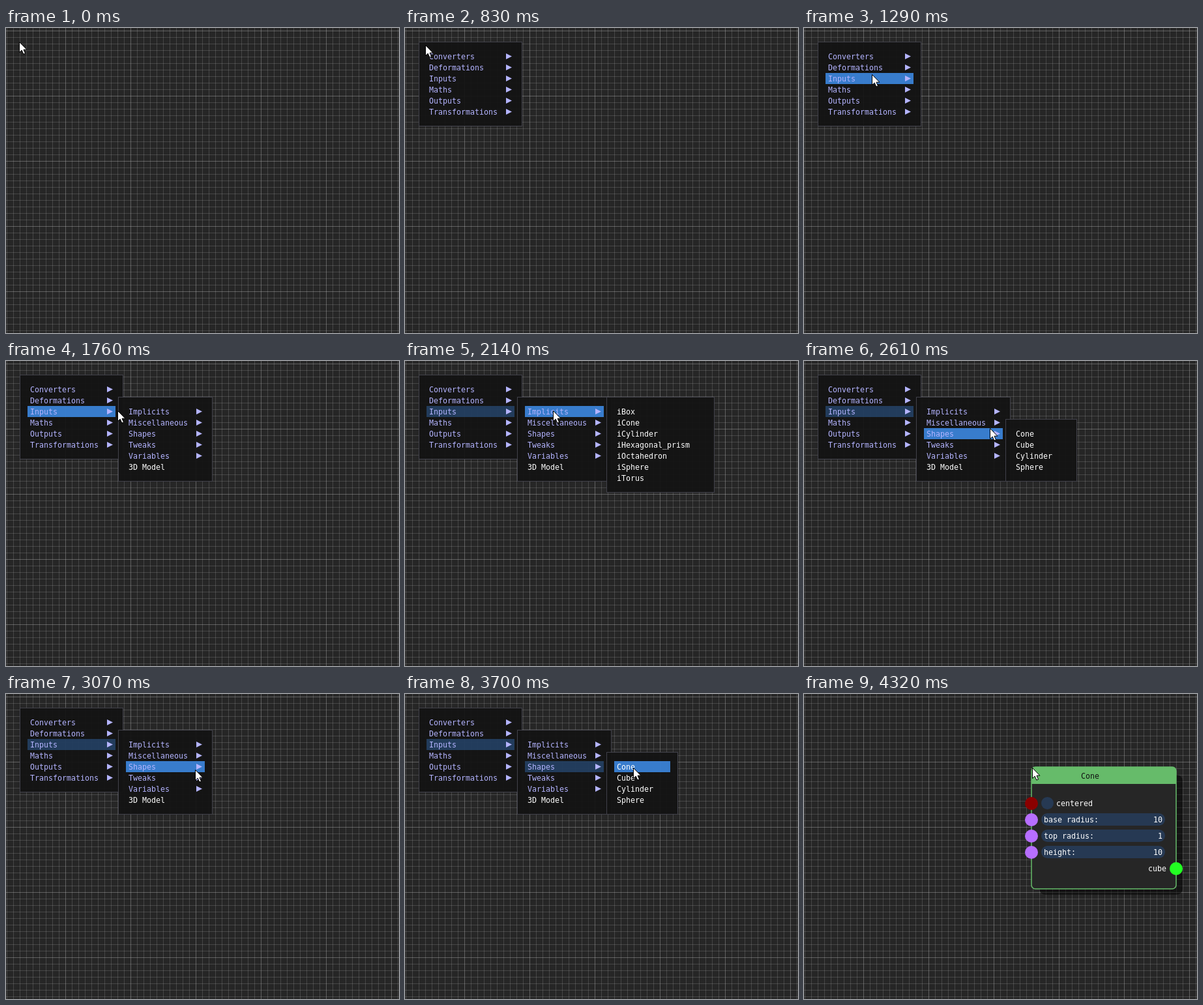
Write an HTML page with a canvas that moves like this. It is 603 px wide and 468 px high and loops after 6.2 s.

```html
<!DOCTYPE html>
<html>
<head>
<meta charset="utf-8">
<style>
html, body { margin: 0; width: 100%; height: 100%; overflow: hidden; background: #262626; }
canvas { display: block; }
</style>
</head>
<body>
<canvas id="stage" width="603" height="468"></canvas>
<script>
const LOOP = 6200, ROW = 17;
const HOVER = 'rgba(66,150,250,.8)', OPEN = 'rgba(66,150,250,.31)';
const LILAC = '#b4b4ff', WHITE = '#fff', GREEN = '#66bb6a', FIELD = '#263953';
const ctx = document.getElementById('stage').getContext('2d');

// Labels ending in ">" open a submenu.
const mainMenu = { x: 21, y: 21, w: 159,
  items: ['Converters>', 'Deformations>', 'Inputs>', 'Maths>', 'Outputs>', 'Transformations>'] };
const inputMenu = { x: 172, y: 55, w: 145,
  items: ['Implicits>', 'Miscellaneous>', 'Shapes>', 'Tweaks>', 'Variables>', '3D Model'] };
const implicitMenu = { x: 309, y: 55, w: 166,
  items: ['iBox', 'iCone', 'iCylinder', 'iHexagonal_prism', 'iOctahedron', 'iSphere', 'iTorus'] };
const shapeMenu = { x: 309, y: 89, w: 110, items: ['Cone', 'Cube', 'Cylinder', 'Sphere'] };

// Pointer moves: first step, last step, number of steps.
const bursts = [[830, 1450, 9], [1680, 2290, 9], [2370, 2920, 8], [3070, 3160, 2], [3480, 3700, 4]];
// Pointer path: time, x, y.
const path = [[0, 20, 21], [830, 31, 26], [1290, 102, 71], [1450, 150, 76], [1680, 160, 76],
  [2140, 227, 76], [2290, 240, 78], [2370, 248, 82], [2610, 286, 103], [2920, 290, 122],
  [3070, 290, 116], [3160, 290, 113], [3480, 298, 112], [3700, 350, 113]];

function stepTime(t) {
  let held = 0;
  for (const [start, end, n] of bursts) {
    if (t < start) break;
    const dt = (end - start) / (n - 1);
    held = start + dt * Math.min(n - 1, Math.floor((t - start + 6) / dt));
  }
  return held;
}

function pointerAt(t) {
  const s = stepTime(t);
  const i = path.findIndex(k => k[0] >= s);
  const b = path[i], a = path[Math.max(0, i - 1)];
  const f = b === a ? 0 : (s - a[0]) / (b[0] - a[0]);
  return { x: Math.round(a[1] + (b[1] - a[1]) * f), y: Math.round(a[2] + (b[2] - a[2]) * f) };
}

function rect(x, y, w, h, color) {
  ctx.fillStyle = color;
  ctx.fillRect(x, y, w, h);
}

function rounded(x, y, w, h, r, color) {
  ctx.fillStyle = color;
  ctx.beginPath();
  ctx.roundRect(x, y, w, h, r);
  ctx.fill();
}

function circle(x, y, r, color) {
  ctx.fillStyle = color;
  ctx.beginPath();
  ctx.arc(x, y, r, 0, 7);
  ctx.fill();
}

function polygon(points, color) {
  ctx.fillStyle = color;
  ctx.beginPath();
  for (const [x, y] of points) ctx.lineTo(x, y);
  ctx.closePath();
  ctx.fill();
}

function text(s, x, y, color = WHITE, align = 'left') {
  ctx.fillStyle = color;
  ctx.textAlign = align;
  ctx.fillText(s, x, y);
}

function drawGrid() {
  rect(0, 0, 603, 468, '#262626');
  const line = 'rgba(200,200,200,.2)';
  for (const gap of [10, 100]) {
    for (let x = gap === 10 ? 1 : 91; x < 603; x += gap) rect(x, 0, 1, 468, line);
    for (let y = 4; y < 468; y += gap) rect(0, y, 603, 1, line);
  }
}

function drawMenu({ x, y, w, items }, active, color, extra = 0) {
  const h = items.length * ROW + 28;
  rect(x, y, w + extra, h, 'rgba(20,20,20,.94)');
  ctx.strokeStyle = 'rgba(110,110,128,.5)';
  ctx.lineWidth = 1;
  ctx.strokeRect(x + .5, y + .5, w + extra - 1, h - 1);
  items.forEach((item, i) => {
    const top = y + 14 + i * ROW, right = x + w - 12;
    const parent = item.endsWith('>');
    if (i === active) rect(x + 12, top, w - 24, ROW, color);
    text(item.replace('>', ''), x + 16, top + 13, parent ? LILAC : WHITE);
    if (parent) polygon([[right - 13, top + 4], [right - 4, top + 8.5], [right - 13, top + 13]], LILAC);
  });
}

function rowAt(menu, p) {
  const inside = p.x >= menu.x + 12 && p.x < menu.x + menu.w - 12;
  return inside ? Math.floor((p.y - menu.y - 14) / ROW) : -1;
}

function drawMenus(t, p) {
  if (t < 1360) return drawMenu(mainMenu, rowAt(mainMenu, p), HOVER);
  const inSub = p.x >= inputMenu.x, inShapes = p.x >= shapeMenu.x;
  drawMenu(mainMenu, 2, inSub ? OPEN : HOVER);
  const row = inShapes ? 2 : inSub ? Math.floor((p.y - 69) / ROW) : -1;
  drawMenu(inputMenu, row, inShapes ? OPEN : HOVER, t < 1680 ? 14 : 0);
  const reopening = t >= 3070 && t < 3160;
  if (row === 0) drawMenu(implicitMenu, -1);
  if (row === 2 && !reopening) drawMenu(shapeMenu, rowAt(shapeMenu, p), HOVER);
}

function drawNode() {
  rounded(361, 124, 220, 184, 9, 'rgba(0,0,0,.5)');
  rounded(349, 112, 222, 187, 6, '#262626');
  rounded(349, 112, 222, 26, [6, 6, 0, 0], GREEN);
  ctx.strokeStyle = GREEN;
  ctx.lineWidth = 1.5;
  ctx.beginPath();
  ctx.roundRect(349, 112, 222, 187, 6);
  ctx.stroke();
  text('Cone', 425, 130, '#111');
  circle(349, 168, 10, '#8b0000');
  circle(373.5, 167.5, 9.5, FIELD);
  text('centered', 387, 172);
  [['base radius:', 10], ['top radius:', 1], ['height:', 10]].forEach(([label, value], i) => {
    const y = 193 + i * 25;
    rounded(364, y - 10, 190, 19, 9.5, FIELD);
    circle(349, y, 10, '#b76eff');
    text(label, 368, y + 4);
    text(value, 550, y + 4, WHITE, 'right');
  });
  text('cube', 528, 272);
  circle(571, 268, 10, '#22ff22');
}

function drawPointer({ x, y }) {
  const arrow = [[0, 0], [0, 16], [3.7, 12.6], [6.3, 18.6], [9, 17.5], [6.5, 11.7], [11.4, 11.7]]
    .map(([dx, dy]) => [x + .5 + dx, y + .5 + dy]);
  polygon(arrow, WHITE);
  ctx.strokeStyle = '#000';
  ctx.lineWidth = 1;
  ctx.stroke();
}

function draw(t) {
  const p = pointerAt(t);
  ctx.font = '11.63px "DejaVu Sans Mono", monospace';
  drawGrid();
  if (t >= 4320) drawNode();
  else if (t >= 350) drawMenus(t, p);
  const clicking = (t >= 350 && t < 510) || (t >= 4170 && t < 4320);
  if (clicking) circle(p.x, p.y, 12, 'rgba(255,255,0,.47)');
  drawPointer(p);
}

const began = performance.now();
function tick() {
  draw((performance.now() - began) % LOOP);
  requestAnimationFrame(tick);
}
tick();
</script>
</body>
</html>
```
